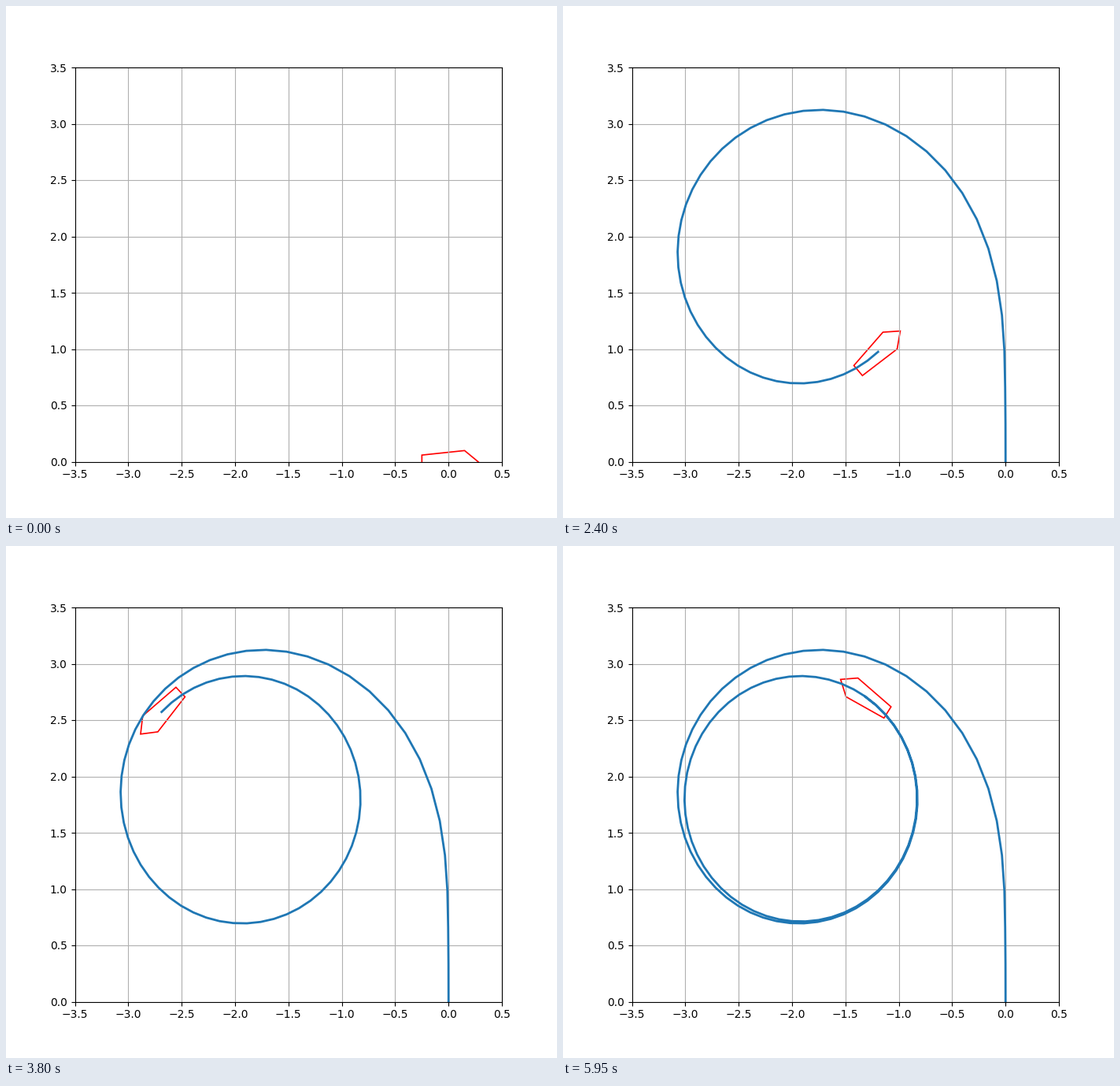
Animation of 700 by 650 pixels, one loop 6 s. Source, as a matplotlib script:

```python
import numpy as np
import matplotlib.pyplot as plt
from matplotlib.animation import FuncAnimation
from matplotlib.patches import Polygon

FRAMES = 120
INTERVAL = 50

# Steady turning circle: centre, radius, starting phase and turn per frame
CENTER = -1.918 + 1.801j
RADIUS = 1.089
PHASE, TURN = np.radians([-2.214, 6.542])

# Half outline of the hull (bow, shoulder, stern), mirrored below
SIDE = np.array([0.278, 0.15 + 0.1j, -0.25 + 0.06j])
HULL = np.concatenate([SIDE, SIDE[:0:-1].conj()])


def position(t):
    """Ship position as a complex number: a spiral settling on the circle."""
    stretch = 0.8826 * np.exp(-0.0965 * t - 0.0092 * t**2 * np.exp(-0.4 * t))
    lag = (67 - 26 * (1 + 0.22 * t) * np.exp(-0.42 * t)) * np.exp(-0.1 * t)
    angle = PHASE + TURN * t - np.radians(lag)
    return CENTER + RADIUS * np.exp(stretch + 1j * angle)


def course(t, eps=1e-3):
    """Unit vector along the direction of travel."""
    step = position(t + eps) - position(t - eps)
    return step / abs(step)


def xy(z):
    return np.column_stack([z.real, z.imag])


track = position(np.arange(FRAMES))

fig = plt.figure(figsize=(7, 6.5), dpi=100)
ax = fig.add_subplot()
ax.set_xlim(-3.5, 0.5)
ax.set_ylim(0, 3.5)
ax.grid(True)

path, = ax.plot([], [], color="tab:blue", lw=2)
ship = ax.add_patch(Polygon(xy(HULL), fill=False, ec="red", lw=1.2))


def update(i):
    heading = course(i) if i else 1  # no course yet before the first move
    ship.set_xy(xy(track[i] + HULL * heading))
    path.set_data(track[:i + 1].real, track[:i + 1].imag)
    return path, ship


anim = FuncAnimation(fig, update, frames=FRAMES, interval=INTERVAL,
                     init_func=lambda: update(0), repeat=True, repeat_delay=0)
plt.show()
```
